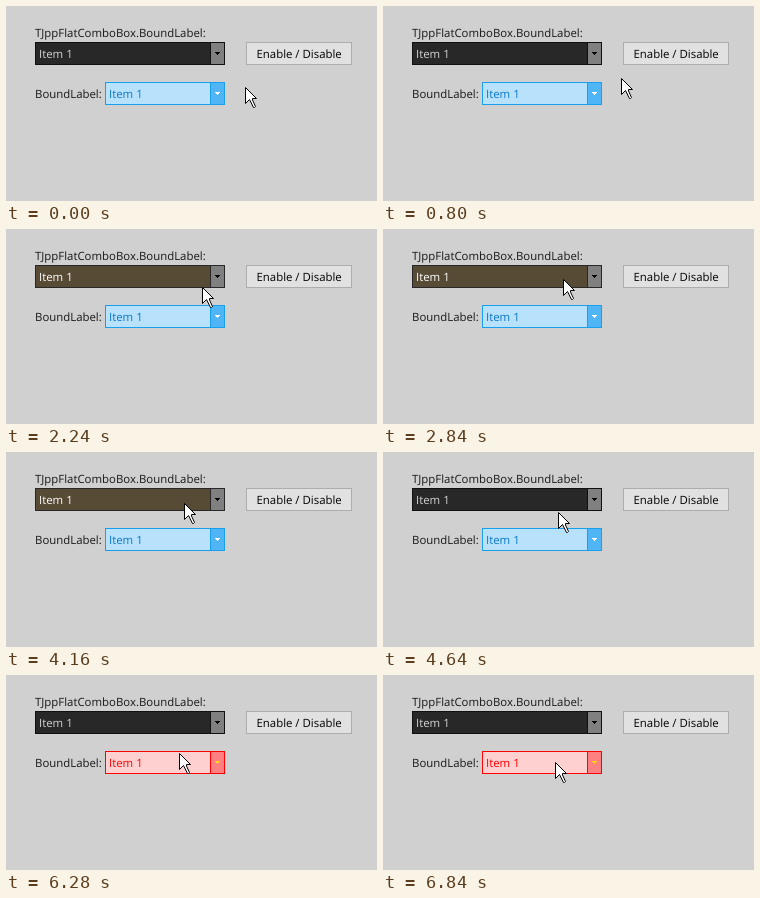
Write an HTML page that moves like this. It is 371 by 195 pixels and loops after 8000 ms.

```html
<!DOCTYPE html>
<html lang="en">
<head>
<meta charset="utf-8">
<title>Combo boxes with bound labels</title>
<style>
  html, body { margin: 0; width: 100%; height: 100%; overflow: hidden; background: #d0d0d0; }
  svg { display: block; }
  text { font: 11.4px "Open Sans", "Noto Sans", sans-serif; fill: #181818; text-rendering: geometricPrecision; }
  rect { stroke: var(--line); }
  .face { fill: var(--face); }
  .drop { fill: var(--drop); }
  .arrow { fill: var(--arrow); shape-rendering: crispEdges; }
  .combo text { fill: var(--ink); }
  #dark { --line: #101010; --face: #282828; --drop: #808080; --arrow: #000; --ink: #d3d3d3; }
  #dark.hot { --line: #282828; --face: #574b36; --ink: #fff; }
  #light { --line: #1a9fec; --face: #b8e1fb; --drop: #50b5f5; --arrow: #fff; --ink: #0a78c8; }
  #light.hot { --line: #f00; --face: #ffd0d0; --drop: #ff8080; --arrow: #ffd21c; --ink: #f00; }
  .button { --line: #adadad; fill: #e1e1e1; }
  .button + text { fill: #000; }
</style>
</head>
<body>
<svg width="371" height="195" viewBox="0 0 371 195">
  <text x="29" y="31">TJppFlatComboBox.BoundLabel:</text>
  <g id="dark" class="combo">
    <rect class="face" x="29.5" y="36.5" width="189" height="22"/>
    <rect class="drop" x="204.5" y="36.5" width="14" height="22"/>
    <path class="arrow" d="M209 46h5v1h-1v1h-1v1h-1v-1h-1v-1h-1z"/>
    <text x="33" y="52">Item 1</text>
  </g>
  <rect class="button" x="240.5" y="36.5" width="105" height="22"/>
  <text x="250.5" y="52">Enable / Disable</text>
  <text x="29" y="92">BoundLabel:</text>
  <g id="light" class="combo">
    <rect class="face" x="99.5" y="76.5" width="119" height="22"/>
    <rect class="drop" x="204.5" y="76.5" width="14" height="22"/>
    <path class="arrow" d="M209 86h5v1h-1v1h-1v1h-1v-1h-1v-1h-1z"/>
    <text x="103" y="92">Item 1</text>
  </g>
  <path id="cursor" d="M.5 .5V16.5L4.5 12.5 8.5 20.5H9.5L10.5 19.5 7.5 13V11.5H11.5Z" fill="#fff" stroke="#000"/>
</svg>
<script>
const LOOP = 8000, TICK = 40;
const home = { x: 239, y: 81 };
// Pointer strokes with rests between them
const strokes = [
  { from: 520, to: 800, x: 238, y: 72 },
  { from: 1200, to: 2000, x: 198, y: 59 },
  { from: 2200, to: 2440, x: 190, y: 55 },
  { from: 2600, to: 2920, x: 178, y: 49 },
  { from: 4120, to: 4160, x: 178, y: 51 },
  { from: 4320, to: 4800, x: 174, y: 63 },
  { from: 5360, to: 5720, x: 174, y: 67 },
  { from: 5840, to: 6840, x: 172, y: 87 }
];
const [dark, light, cursor] = ["dark", "light", "cursor"].map(id => document.getElementById(id));

const easeOut = k => 1 - (1 - k) ** 1.4;

function pointerAt(time) {
  let { x, y } = home;
  for (const s of strokes) {
    const k = easeOut(Math.min(1, Math.max(0, (time - s.from) / (s.to - s.from))));
    x += (s.x - x) * k;
    y += (s.y - y) * k;
  }
  return [Math.round(x), Math.round(y)];
}

function draw(now) {
  const time = Math.floor((now % LOOP) / TICK) * TICK;
  const [x, y] = pointerAt(time);
  const over = (left, top) => x >= left && x < 219 && y >= top && y < top + 23;
  cursor.setAttribute("transform", `translate(${x} ${y})`);
  dark.classList.toggle("hot", over(29, 36));
  light.classList.toggle("hot", over(99, 76));
}

let start;
function frame(now) {
  start ??= now;
  draw(now - start);
  requestAnimationFrame(frame);
}
draw(0);
requestAnimationFrame(frame);
</script>
</body>
</html>
```
